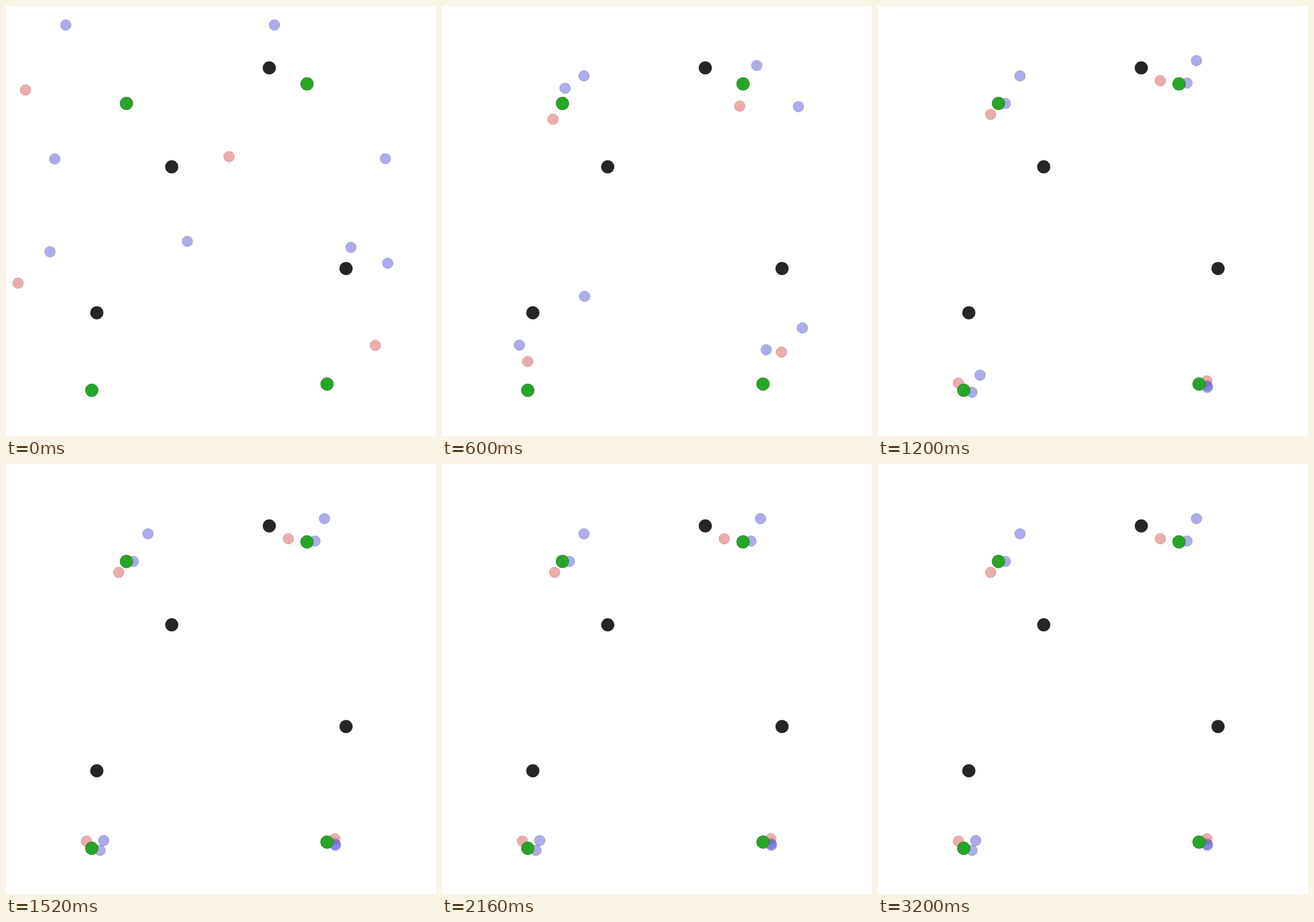
Write an HTML page that moves like this. It is 748x748 px and loops after 3240 ms.

```html
<!DOCTYPE html>
<html lang="en">
<head>
<meta charset="utf-8">
<title>Agents gathering at landmarks</title>
<style>
  html, body { margin: 0; width: 100%; height: 100%; overflow: hidden; background: #fff; }
  svg { display: block; width: 100%; height: 100%; }
</style>
</head>
<body>
<svg id="stage" viewBox="0 0 748 748"></svg>
<script>
const LOOP = 3240, STEP = 40;
const AGENT_RADIUS = 9.35, LANDMARK_RADIUS = 11.2;
const RED = [217, 89, 89], BLUE = [89, 89, 217], BLACK = [38, 38, 38], GREEN = [38, 166, 38];

const stage = document.getElementById("stage");
const agents = [];

function addCircle(color, radius, opacity) {
  const circle = document.createElementNS("http://www.w3.org/2000/svg", "circle");
  const attributes = {
    r: radius,
    fill: `rgba(${color},${opacity})`,
    stroke: `rgba(${color.map(c => c >> 1)},${opacity / 2})`
  };
  for (const name in attributes) circle.setAttribute(name, attributes[name]);
  return stage.appendChild(circle);
}

function place(circle, x, y) {
  circle.setAttribute("cx", x);
  circle.setAttribute("cy", y);
}

// Distance covered at full thrust against drag: speed builds up from rest.
const travel = step => step - 3 * (1 - 0.75 ** step);
const LAUNCHED = travel(7), NEAR = travel(15), MIN_BRAKING = 10;

const gap = (a, b) => Math.hypot(b[0] - a[0], b[1] - a[1]);

// Smooth curve through the values, coming to rest at the last one.
function curve(times, values) {
  const last = times.length - 1;
  const width = i => times[i + 1] - times[i];
  const slope = i => (values[i + 1] - values[i]) / width(i);
  const tangents = values.map((_, i) => {
    if (i === 0) return slope(0);
    if (i === last) return 0;
    return (slope(i - 1) * width(i) + slope(i) * width(i - 1)) / (width(i) + width(i - 1));
  });
  return time => {
    if (time >= times[last]) return values[last];
    let i = 0;
    while (time >= times[i + 1]) i++;
    const u = (time - times[i]) / width(i), v = 1 - u;
    return values[i] * (1 + 2 * u) * v * v + values[i + 1] * (3 - 2 * u) * u * u +
      width(i) * u * v * (tangents[i] * v - tangents[i + 1] * u);
  };
}

// An agent launches, nears its goal, then brakes for as long as its speed demands.
function addAgent(color, start, launched, near, rest) {
  const points = [start, launched, near];
  const times = [0, LAUNCHED, NEAR];
  if (rest) {
    const speed = gap(launched, near) / (NEAR - LAUNCHED);
    points.push(rest);
    times.push(NEAR + Math.max(MIN_BRAKING, 1.2 * gap(near, rest) / speed));
  }
  agents.push({
    circle: addCircle(color, AGENT_RADIUS, 0.5),
    x: curve(times, points.map(point => point[0])),
    y: curve(times, points.map(point => point[1]))
  });
}

function addLandmark(color, x, y) {
  place(addCircle(color, LANDMARK_RADIUS, 1), x, y);
}

addAgent(RED, [34, 146], [99, 174.5], [193, 197], [196, 188.5]);
addAgent(RED, [388, 262], [469.5, 212], [518, 174], [491, 130]);
addAgent(RED, [21, 482], [89, 567.5], [149, 618.5], [140, 656]);
addAgent(RED, [642.5, 590.5], [626, 585], [590.5, 602], [572, 652]);

addAgent(BLUE, [104, 33], [188, 68.5], [247, 121.5]);
addAgent(BLUE, [467, 33], [514, 90], [547.5, 103.5], [554, 95]);
addAgent(BLUE, [85, 266], [175, 190], [214, 143], [221.5, 169.5]);
addAgent(BLUE, [660, 265.5], [650, 228], [620, 175], [537.5, 134]);
addAgent(BLUE, [76.5, 427.5], [112, 500.5], [134.5, 590], [163.5, 672]);
addAgent(BLUE, [315.5, 409.5], [275, 430], [248, 505], [170, 655]);
addAgent(BLUE, [600, 420], [629, 474], [627, 560], [572.5, 661]);
addAgent(BLUE, [664, 447.5], [613, 506], [564, 598], [573, 663.5]);

addLandmark(BLACK, 458, 107.7);
addLandmark(BLACK, 288.3, 279.8);
addLandmark(BLACK, 591.5, 456.7);
addLandmark(BLACK, 158, 533.7);
addLandmark(GREEN, 209.5, 169.5);
addLandmark(GREEN, 523.7, 135.5);
addLandmark(GREEN, 149.2, 668.5);
addLandmark(GREEN, 558.5, 657.7);

function draw(ms) {
  const time = travel(Math.floor((ms % LOOP) / STEP));
  for (const { circle, x, y } of agents) place(circle, x(time), y(time));
}

let start;
function tick(now) {
  start ??= now;
  draw(now - start);
  requestAnimationFrame(tick);
}
draw(0);
requestAnimationFrame(tick);
</script>
</body>
</html>
```
